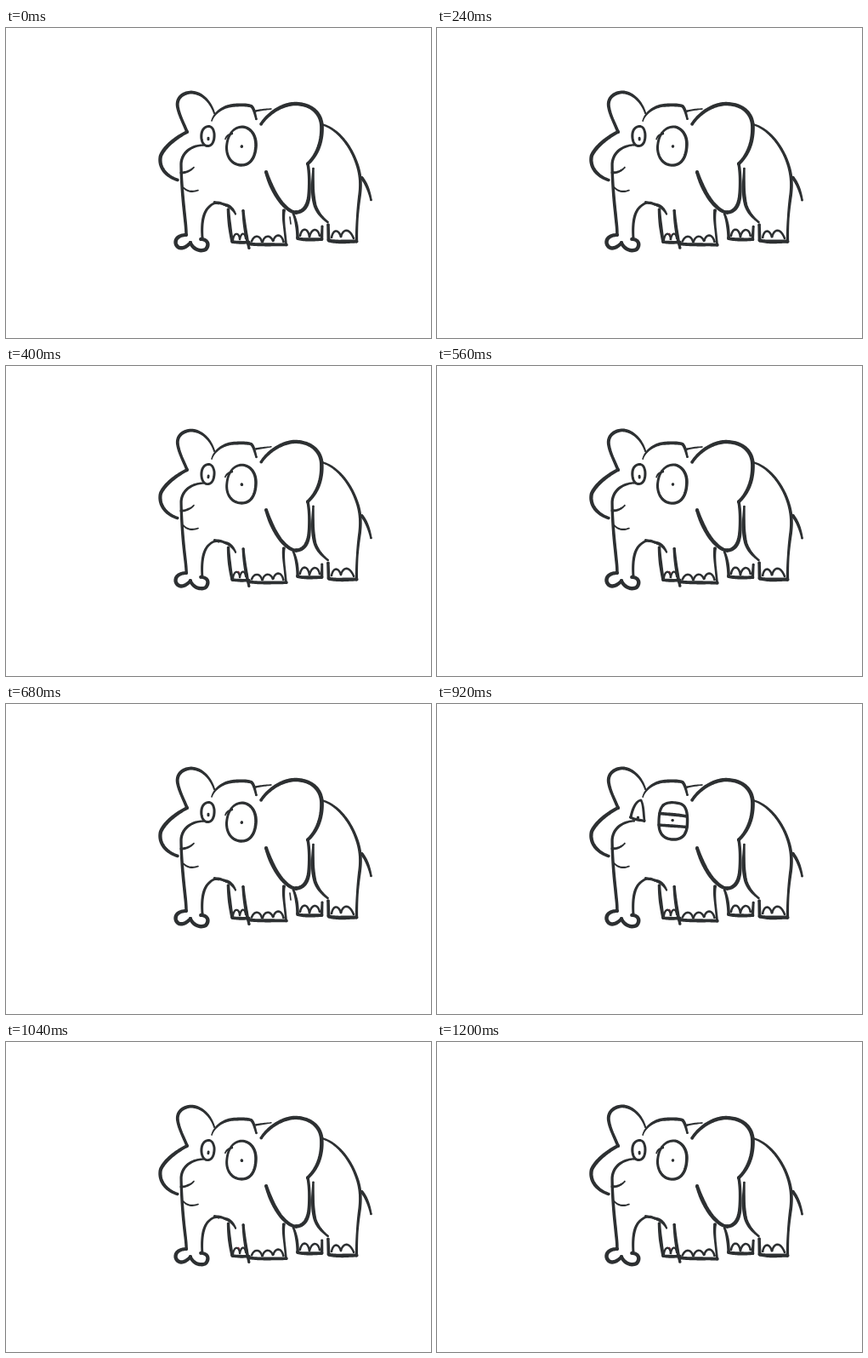
Animation of 500x364 px, one loop 1.32 s. Source, as an HTML page:

```html
<!DOCTYPE html>
<html lang="en">
<head>
<meta charset="utf-8">
<title>Blinking elephant</title>
<style>
  html, body { margin: 0; width: 100%; height: 100%; overflow: hidden; background: #fff; }
  svg { display: block; width: 500px; height: 364px; }
  .ink { fill: #2d3032; stroke: #2d3032; stroke-width: 1.5; stroke-linejoin: round; }
  .pose { visibility: hidden; animation: 1320ms step-end infinite; }
  .a { animation-name: a; }
  .b { animation-name: b; }
  .c { animation-name: c; }
  .b-eyes { animation-name: b-eyes; }
  .half { animation-name: half; }
  .shut { animation-name: shut; }
  @keyframes a {
    0%, 51.5152% { visibility: visible; }
    18.1818%, 69.697%, 100% { visibility: hidden; }
  }
  @keyframes b {
    0%, 30.303%, 51.5152%, 78.7879% { visibility: hidden; }
    18.1818%, 42.4242%, 69.697%, 90.9091%, 100% { visibility: visible; }
  }
  @keyframes c {
    0%, 42.4242%, 90.9091%, 100% { visibility: hidden; }
    30.303%, 78.7879% { visibility: visible; }
  }
  @keyframes b-eyes {
    0%, 30.303%, 51.5152% { visibility: hidden; }
    18.1818%, 42.4242%, 90.9091%, 100% { visibility: visible; }
  }
  @keyframes half {
    0%, 72.7273%, 100% { visibility: hidden; }
    69.697% { visibility: visible; }
  }
  @keyframes shut {
    0%, 78.7879%, 100% { visibility: hidden; }
    72.7273% { visibility: visible; }
  }
</style>
</head>
<body>
<svg id="stage" viewBox="0 0 500 364">
  <!-- data-w: brush widths spread evenly along the stroke -->
  <defs>
    <g id="body">
      <!-- ears -->
      <path d="M245 100 C241 87 231 76 218 75.5 C207 76 200 83 202 93 C204 103 209 112 213 122" data-w="1.2 2 2.8 3.2 3 2.6 2.8"/>
      <path d="M213 122 C203 127 187 138 182 150 C179 163 188 174 202 178.5" data-w="3 3.4 3.6 3.4 3.2 2.6"/>
      <path d="M300 113 C307 102 323 89.5 340 89 C358 89 371 99 371.5 116 C372 137 364 151 355 159.5" data-w="2.6 3.2 3.6 3.4 3.8 3.8 3.6 3"/>
      <path d="M355 159.5 C357 168 357.5 190 356 200 C354 211 349 216 341 216.5" data-w="2.6 2.6 3.2 3.8 3.4"/>
      <path d="M306 169 C310 182 316 195 324 205 C331 213 336 216.5 342 216.5" data-w="3.2 4 3.8 3.6 3"/>
      <!-- head -->
      <path d="M242 109 C244 102 252 93 266 91 C276 90 285 90 289 92 C292 95 293 102 294.5 107" data-w=".6 1.8 2.6 3 3 2.6 1.6"/>
      <path d="M294 97.5 C300 96 307 95.5 312 95" data-w="1.4 1.2 .7"/>
      <!-- trunk and mouth -->
      <path d="M232 137.5 C218 138 207 146 206 159 C206 176 208 200 210 218 C211 228 212 235 212 243" data-w="1.4 2.4 2.4 2.6 2.8 2.8 2.6"/>
      <path d="M212 243 C203 243 198 248 200 254 C203 261 211 259 217 252" data-w="3 3.6 3.6 3.2"/>
      <path d="M217 252 C220 260 229 263 235 260 C240 254 237 248 229 248" data-w="3.2 3.6 3.6 3"/>
      <path d="M231 246 C230 232 231 217 239 210 C243 206 246 205 250 206" data-w="2 2.2 2.4 2 1.6"/>
      <path d="M245 204.5 C250 205 255 206 259 208.5" data-w="1.6 2.4 1.6"/>
      <path d="M256 207 C262 208 267 212 270 218.5" data-w="1.8 3 2.4 1.2"/>
      <path d="M206 170 C212 170 218 167 221 163.5" data-w="2.2 1.8 .8"/>
      <path d="M209 187.5 C213 192 219 193 226 190.5" data-w=".8 1.5 .8"/>
      <!-- back and tail -->
      <path d="M372.5 113.5 C389 118 404 136 411.5 156 C417 170 418 182 416 197 C414 212 412.5 228 412.5 249" data-w="1.4 2.2 2.4 2.8 2.8 2 2.4"/>
      <path d="M418.5 176 C423 181 427 190 429.5 202" data-w="3 2.6 1.6"/>
      <!-- hind legs -->
      <path d="M361.5 165 C361 180 360 193 363 206 C365 215 371 222 378.5 228" data-w="1.6 3 3.6 3 1.6"/>
      <path d="M379 231 L379.5 249" data-w="2.6 3"/>
      <path d="M380 249.5 C390 252 402 250.5 412.5 250.5" data-w="3.2 3.8 3.2"/>
      <path d="M383 246 C385 236 391 236 394 245" data-w="1.6"/>
      <path d="M394 245 C397 235 404 235 409 247" data-w="1.6"/>
      <path d="M338 218 C341 225 343 235 343 246" data-w="1.8 2.8 2.6"/>
      <path d="M343 247 C350 249 362 248.5 371.5 248" data-w="2.8 3.4 2.8"/>
      <path d="M372 233 L371.5 248" data-w="2 2.6"/>
      <path d="M346 244 C348 234 355 234 357 245" data-w="1.6"/>
      <path d="M357 245 C360 234 367 235 369 244" data-w="1.6"/>
      <!-- front legs -->
      <path d="M261.5 213 C262 225 264 240 266 250" data-w="2.6 3.4 2.8"/>
      <path d="M266 251 C272 252 280 252 286 251.5" data-w="2.6 3 2.6"/>
      <path d="M267 249 C268 240 274 239 275 248" data-w="1.4"/>
      <path d="M275 248 C277 239 281 240 282 247" data-w="1.4"/>
      <path d="M279 214.5 C280 228 282.5 245 286 258.5" data-w="2.4 3 3.2 2.2"/>
      <path d="M286 253.5 C300 255 315 254 330 254.5" data-w="2.8 3.2 2.8"/>
      <path d="M327 214 C325.5 225 328 236 329.5 254" data-w="2.8 1.8 1.8"/>
      <path d="M289 250.5 C292 242.5 299 243 301 251" data-w="1.6"/>
      <path d="M302 251 C304 243 311 242.5 314 250" data-w="1.6"/>
      <path d="M314.5 249.5 C317 241.5 324 241 326.5 251" data-w="1.6"/>
    </g>
    <g id="open">
      <path d="M239 115.5 C232 115.5 229 122 230 130 C231 136 234 139 238 138.5 C243 138 245.5 132 245 124 C244 118 242 115.5 238 115.5" data-w="2 2.2 2 2.2 1.8"/>
      <path d="M238 129 L238 131" data-w="1.8"/>
      <path d="M258 130.5 C259 127 262 125.5 266 124" data-w=".7 1.5 1.5"/>
      <path d="M265 123 C268 118 275 115 281 116.5 C290 119 294.5 128 294 139 C293 153 287 161.5 276 161 C265 160 259.5 151 259.5 140 C260 132 262 127 265 123" data-w="1.6 2.4 2.8 2.6 2.4 2.2 1.8"/>
      <path d="M277.3 139 L277.4 139.2" data-w="2.4"/>
    </g>
    <g id="half">
      <path d="M240 113 C235 113 230 122 228 133" data-w="1.6 2.2 2.2"/>
      <path d="M240 113 C243 118 243 129 244 137" data-w="1.6 2 1.8"/>
      <path d="M227.5 133 C233 136 239 136 244 137.5" data-w="2 2.6 2"/>
      <path d="M236.3 133.2 L236.5 133.3" data-w="2.2"/>
      <path d="M266 119 C270 115 279 115 286 117 C293 119 295 127 294.5 140 C294 153 289 159.5 277 159 C266 158 261 152 261 140 C261 131 262 123 266 119" data-w="2.2 2.4 2.6 2.6 2.4 2.2"/>
      <path d="M262 128.5 C272 129.5 284 130 294 132" data-w="2.6 3 2.6"/>
      <path d="M261 142 C272 143 284 143.5 294 144.5" data-w="2.4 2.8 2.4"/>
      <path d="M277 136.5 L277.2 136.6" data-w="2.2"/>
    </g>
    <g id="shut">
      <path d="M240 113 C235 113 230 122 228 134" data-w="1.6 2.2 2.2"/>
      <path d="M240 113 C243 118 243 129 244 138" data-w="1.6 2 1.8"/>
      <path d="M227.5 134.5 C233 137 239 137 244 138" data-w="2.2 2.8 2.2"/>
      <path d="M266 119 C270 115 279 115 286 117 C293 119 295 127 294.5 140 C294 153 289 159.5 277 159 C266 158 261 152 261 140 C261 131 262 123 266 119" data-w="2.2 2.4 2.6 2.6 2.4 2.2"/>
      <path d="M261 140 C272 141 284 141.5 294 142.5" data-w="2.6 3.2 2.6"/>
    </g>
    <g id="dashes">
      <path d="M334 222 L335 230" data-w=".4 .2"/>
    </g>
  </defs>
</svg>
<script>
  const NS = 'http://www.w3.org/2000/svg';
  const stage = document.getElementById('stage');
  const make = (tag, attrs) => {
    const el = document.createElementNS(NS, tag);
    for (const key in attrs) el.setAttribute(key, attrs[key]);
    return el;
  };

  let seed = 7;
  const random = () => (seed = seed * 16807 % 2147483647) / 2147483647;
  const wobble = (d, amount) =>
    d.replace(/[\d.]+/g, n => (+n + (random() - .5) * amount).toFixed(2));

  // Outline of a brush stroke whose width varies along the path
  function brush(path, amount, weight) {
    const line = make('path', { d: wobble(path.getAttribute('d'), amount) });
    const widths = path.dataset.w.split(' ').map(Number);
    const length = line.getTotalLength();
    const steps = Math.max(4, Math.ceil(length / 1.5));
    const left = [], right = [], ends = [];
    for (let i = 0; i <= steps; i++) {
      const t = i / steps, s = t * length;
      const p = line.getPointAtLength(s);
      const p0 = line.getPointAtLength(Math.max(0, s - .5));
      const p1 = line.getPointAtLength(Math.min(length, s + .5));
      const dx = p1.x - p0.x, dy = p1.y - p0.y, n = Math.hypot(dx, dy) || 1;
      const k = t * (widths.length - 1), j = Math.floor(k);
      const next = widths[Math.min(j + 1, widths.length - 1)];
      const r = Math.max(.05, (widths[j] + (next - widths[j]) * (k - j)) * weight / 2 - .3);
      const ox = -dy / n * r, oy = dx / n * r;
      left.push([p.x + ox, p.y + oy]);
      right.unshift([p.x - ox, p.y - oy]);
      if (i === 0 || i === steps) ends.push({ cx: p.x, cy: p.y, r });
    }
    const points = left.concat(right).map(q => q.map(v => v.toFixed(2)).join()).join(' ');
    return [make('polygon', { points }), ...ends.map(e => make('circle', e))];
  }

  function pose(name, parts, amount = 0, weight = 1) {
    const group = make('g', { class: 'pose ink ' + name });
    for (const id of parts)
      for (const path of document.querySelectorAll(`#${id} path`))
        group.append(...brush(path, amount, weight));
    stage.append(group);
    return group;
  }

  const tint = () => make('path', {
    d: 'M273 241 L275 243', stroke: '#7a3040', 'stroke-width': 1.2, fill: 'none'
  });

  pose('a', ['body', 'open', 'dashes']);
  pose('b', ['body'], .4).append(tint());
  pose('b-eyes', ['open'], .4);
  pose('c', ['body', 'open'], .4, .96).append(tint());
  pose('half', ['half']);
  pose('shut', ['shut']);
</script>
</body>
</html>
```
